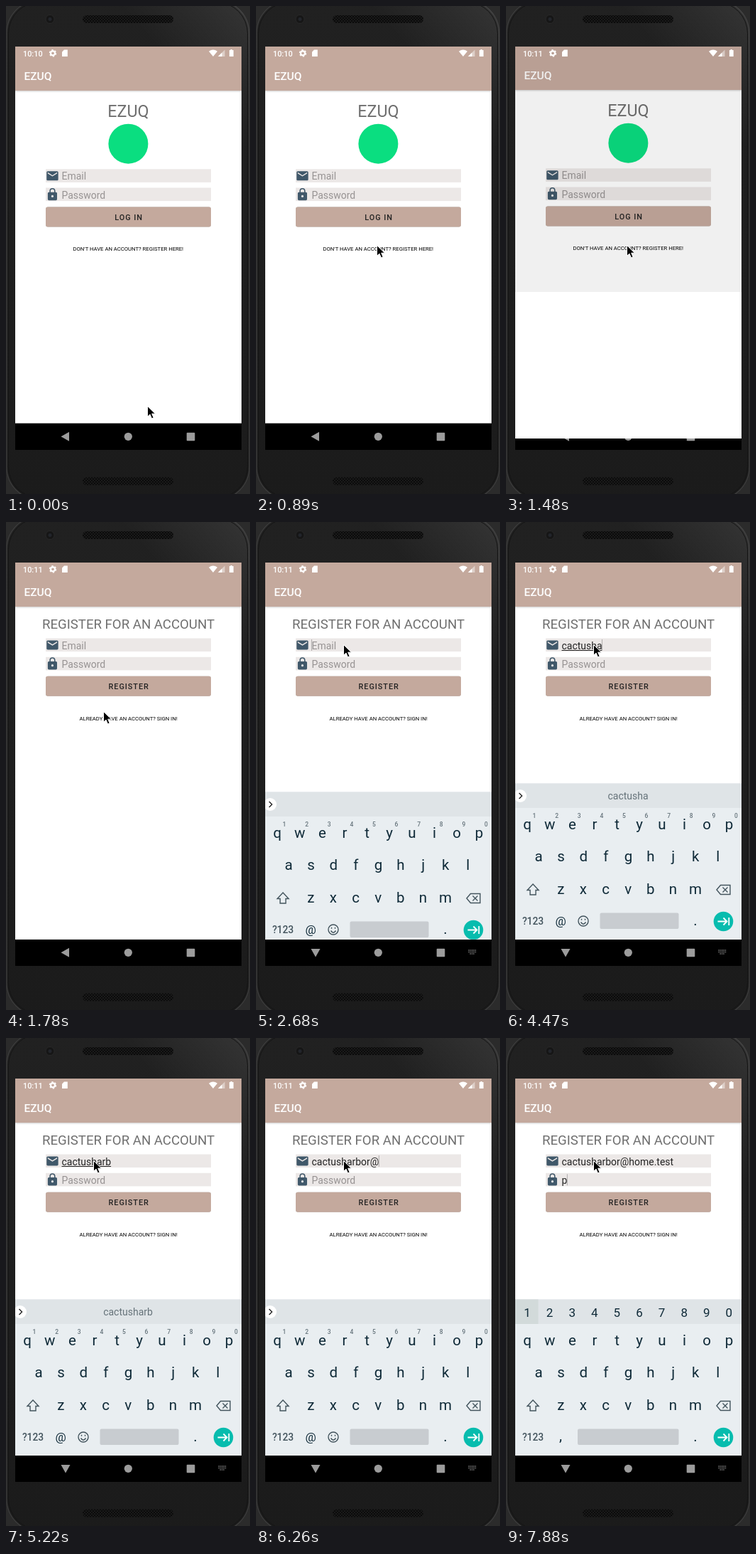
Recreate the animation shown at these times as an HTML page. Size 344x686 px, loop 8000 ms.

```html
<!DOCTYPE html>
<html lang="en">
<head>
<meta charset="utf-8">
<title>Register flow</title>
<style>
html, body { margin: 0; width: 100%; height: 100%; overflow: hidden; background: #2b2b2b; }
svg { display: block; width: 344px; height: 686px; font-family: Roboto, sans-serif; }
text { white-space: pre; }
.mid { text-anchor: middle; }
.med { font-weight: 500; }
.bar, .btn { fill: #c4a99d; }
.btn { filter: drop-shadow(0 .8px .5px rgba(0,0,0,.28)); }
.bar { filter: drop-shadow(0 1px 1px rgba(0,0,0,.2)); }
.hint { fill: #979393; }
.input, .hint { font-size: 13.97px; }
.input { fill: #242424; }
.head { fill: #6f6f6f; }
.icon { fill: #40586a; }
.key { fill: #0f2a38; font-size: 20.5px; text-anchor: middle; }
.line { fill: none; stroke: #43545d; stroke-width: 1.4; }
</style>
</head>
<body>
<svg viewBox="0 0 344 686">
  <defs>
    <pattern id="mesh" width="4" height="4" patternUnits="userSpaceOnUse">
      <rect width="4" height="4" fill="#0b0b0b"/>
      <circle cx="1" cy="1" r=".8" fill="#2c2c2c"/><circle cx="3" cy="3" r=".8" fill="#2c2c2c"/>
    </pattern>
    <linearGradient id="body" x2="0" y2="1">
      <stop offset="0" stop-color="#212121"/><stop offset="1" stop-color="#1b1b1b"/>
    </linearGradient>
    <linearGradient id="glare" gradientUnits="userSpaceOnUse" x1="344" y1="0" x2="240" y2="90">
      <stop offset="0" stop-color="#fff" stop-opacity=".09"/><stop offset="1" stop-color="#fff" stop-opacity="0"/>
    </linearGradient>
    <clipPath id="screen"><rect x="13" y="57" width="319" height="567"/></clipPath>
    <clipPath id="app"><rect x="13" y="57" width="319" height="529.800"/></clipPath>
    <clipPath id="reveal"><rect id="revealBox" x="13" width="319" height="600"/></clipPath>
  </defs>

  <rect x="1" y="-8" width="342" height="702" rx="46" fill="url(#body)" stroke="#3d3d3d" stroke-width="1.2"/>
  <rect x="1" y="-8" width="342" height="702" rx="46" fill="url(#glare)"/>
  <rect x="3.500" y="-5.500" width="337" height="697" rx="44" fill="none" stroke="#151515"/>
  <circle cx="62" cy="18.500" r="6" fill="#161616" stroke="#292929"/>
  <circle cx="62" cy="18.500" r="2.500" fill="#22252b"/>
  <rect x="108" y="13" width="128" height="11" rx="5.500" fill="url(#mesh)"/>
  <rect x="108" y="662.500" width="128" height="11" rx="5.500" fill="url(#mesh)"/>

  <g clip-path="url(#screen)">
    <rect x="13" y="57" width="319" height="567"/>
    <g fill="#9c9c9c">
      <path id="back"/>
      <circle cx="172.300" cy="605.300" r="5.600"/>
      <rect x="254.700" y="599.700" width="11.600" height="11.600" rx="1"/>
      <path id="imeIcon" d="M299.500 602H310.500M299.500 604.500H310.500M301.500 607H308.500" fill="none" stroke="#777" stroke-width="1.500" stroke-dasharray="1.500 .8"/>
    </g>
    <g clip-path="url(#app)">
      <g id="login"></g>
      <rect id="dim" x="13" y="57" width="319" height="530" opacity=".06"/>
    </g>
    <g clip-path="url(#reveal)"><g id="register"></g></g>
    <g clip-path="url(#app)"><g id="keyboard"></g></g>
    <g id="status" fill="#fff"></g>
  </g>
  <path id="mouse" d="M0 0V14.800L3.500 11.600L6 17.400L8.600 16.300L6.200 10.700H11Z" stroke="#fff" stroke-width="1"/>
</svg>
<script>
const $ = id => document.getElementById(id);
const LOOP = 8000, APP = 'EZUQ', USER = 'cactusharbor', HOST = 'home.test';

const MAIL = 'M20 4H4c-1.100 0-2 .9-2 2v12c0 1.100.9 2 2 2h16c1.100 0 2-.9 2-2V6c0-1.100-.9-2-2-2zm0 4l-8 5-8-5V6l8 5 8-5z';
const LOCK = 'M18 8h-1V6a5 5 0 0 0-10 0v2H6a2 2 0 0 0-2 2v10a2 2 0 0 0 2 2h12a2 2 0 0 0 2-2V10a2 2 0 0 0-2-2zm-6 9a2 2 0 1 1 0-4a2 2 0 0 1 0 4zm3.100-9H8.900V6a3.100 3.100 0 0 1 6.200 0z';

const text = (x, y, size, str, cls = '', extra = '') =>
  `<text x="${x}" y="${y}" font-size="${size}" class="${cls}" ${extra}>${str}</text>`;

const field = (y, icon, hint, id = '') => `
  <rect x="56" y="${y}" width="233" height="18.600" fill="#ece8e7"/>
  <path class="icon" d="${icon}" transform="translate(55.600 ${y - .4}) scale(.82)"/>
  <text class="hint" x="78.500" y="${y + 15}" id="${id}Hint">${hint}</text>
  ${id && `<text class="input" x="78.500" y="${y + 15}" id="${id}"></text>`}`;

const button = (y, label) => `
  <rect class="btn" x="56" y="${y}" width="233" height="28" rx="3"/>
  ${text(173.200, y + 18, 10.860, label, 'mid med', 'letter-spacing=".97" fill="#222"')}`;

const page = content => `
  <rect x="13" y="57" width="319" height="529.800" fill="#fff"/>
  <rect class="bar" x="13" y="57" width="319" height="62"/>
  ${text(25.400, 103.500, 15.520, APP, 'med', 'fill="#fff"')}${content}`;

$('login').innerHTML = page(`
  ${text(172.500, 155.500, 23.280, APP, 'mid head')}
  <circle cx="172.400" cy="193.700" r="28" fill="#0ade80"/>
  ${field(229.300, MAIL, 'Email')}${field(255.500, LOCK, 'Password')}
  ${button(282.500, 'LOG IN')}
  <rect id="ripple" x="56" y="327" width="233" height="28" rx="3" opacity=".1"/>
  ${text(172.300, 344.300, 7.700, "DON'T HAVE AN ACCOUNT? REGISTER HERE!", 'mid')}`);

$('register').innerHTML = page(`
  ${text(172.500, 150, 18.620, 'REGISTER FOR AN ACCOUNT', 'mid head')}
  ${field(163.500, MAIL, 'Email', 'email')}${field(189.800, LOCK, 'Password', 'pass')}
  ${button(216.800, 'REGISTER')}
  <rect id="underline" y="180" height="1" fill="#242424"/>
  <rect id="caret" width="1" height="16" fill="#b0adad"/>
  ${text(172.600, 278.600, 7.700, 'ALREADY HAVE AN ACCOUNT? SIGN IN!', 'mid')}`);

const row = (chars, x, y, size = 20.5, cls = 'key', extra = '') => [...chars].map((c, i) =>
  `<text class="${cls}" x="${x + 31.6 * i}" y="${y}" style="font-size:${size}px" ${extra}>${c}</text>`).join('');

$('keyboard').innerHTML = `
  <rect x="13" y="367.500" width="319" height="220" fill="#e9eef1"/>
  <rect x="13" y="367.500" width="319" height="34.500" fill="#dfe4e7"/>
  <g id="mailKeys">
    <circle cx="20" cy="385" r="9" fill="#fff"/>
    <path class="line" d="M18.500 381L22.500 385L18.500 389" style="stroke:#222"/>
    <text id="suggest" class="mid" x="172" y="390" font-size="14" fill="#66737a"></text>
    ${row('1234567890', 40, 416, 8.5, 'mid med', 'fill="#66747c"')}
    ${text(77.200, 567, 17, '@', 'mid', 'fill="#0f2a38"')}
    <circle class="line" cx="109" cy="561" r="7"/>
    <path class="line" d="M105.500 562.500Q109 568 112.500 562.500M106.500 557.800V559.800M111.500 557.800V559.800"/>
  </g>
  <g id="passKeys">
    <rect id="press" x="13" y="367.500" width="32.500" height="34.500" fill="#d2dada"/>
    ${row('1234567890', 30, 391.8, 17)}
    ${text(77, 566, 20.500, ',', 'key')}
  </g>
  ${row('qwertyuiop', 30.2, 432)}${row('asdfghjkl', 46, 477.3)}${row('zxcvbnm', 77.3, 523)}
  <path class="line" d="M38 509L46 517.500H42V524H34V517.500H30Z"/>
  <path class="line" d="M297 517L302.500 510.500H316V523.500H302.500ZM305.500 513.500L312.500 520.500M312.500 513.500L305.500 520.500"/>
  ${text(38, 566, 13.800, '?123', 'mid med', 'fill="#43545d"')}
  <rect id="space" y="549.500" height="22.500" rx="2" fill="#c8ccd0"/>
  ${text(267, 567, 20.500, '.', 'key')}
  <circle cx="306.500" cy="561.500" r="13.800" fill="#07bcae"/>
  <path class="line" d="M298.500 561.500H311M306.500 556.500L311.500 561.500L306.500 566.500M314.300 556V567" style="stroke:#fff;stroke-width:1.800"/>`;

$('status').innerHTML = `
  <text id="clock" class="med" x="24" y="70.500" font-size="10.860"></text>
  <circle cx="66" cy="66.300" r="3" fill="none" stroke="#fff" stroke-width="2.200"/>
  <circle cx="66" cy="66.300" r="4.500" fill="none" stroke="#fff" stroke-width="1.400" stroke-dasharray="2.360"/>
  <path d="M82 61.500H86.800V71H79V64.500Z"/>
  <path d="M286 63.700Q292 59.300 298 63.700L292 71Z"/>
  <path d="M308.500 61.500V71H299Z" opacity=".45"/><path d="M304.500 65.500V71H299Z"/>
  <path d="M316.500 61H318.800V62H320.700V71H314.900V62H316.500Z"/>`;

// Step tables: [start time, value...]; a value holds until the next row.
const mousePath = [[0, 199.5, 562.5], [290, 205, 542], [440, 206, 476], [590, 196, 408], [740, 179, 355],
  [890, 170.5, 336.5], [1630, 157, 312], [1780, 137.5, 266.5], [1930, 128, 212], [2080, 123.5, 172.5]];
const openSteps = [[0, 600, 0], [1480, 402, 21.2], [1630, 57, 3], [1780, 57, 0]];
const slideSteps = [[0, 220], [2380, 150], [2530, 55], [2680, 12], [2830, 0]];
const userSteps = [[0, 0], [3130, 1], [3430, 2], [3580, 4], [3880, 5], [4020, 7], [4470, 8],
  [4620, 9], [4770, 10], [5510, 11], [5660, 12], [6260, 13]];
const hostSteps = [[0, 0], [6410, 1], [6560, 2], [6700, 4], [6850, 5], [7000, 7], [7140, 9]];

const at = (steps, t) => steps.findLast(s => s[0] <= t).slice(1);
const set = (id, attrs) => { for (const k in attrs) $(id).setAttribute(k, attrs[k]); };
const show = (id, on) => $(id).setAttribute('visibility', on ? 'inherit' : 'hidden');
const move = (id, x, y) => set(id, { transform: `translate(${x} ${y})` });

function draw(t) {
  move('mouse', ...at(mousePath, t));
  $('clock').textContent = t < 1180 ? '10:10' : '10:11';

  const [top, shift] = at(openSteps, t);
  set('revealBox', { y: top });
  move('register', 0, shift);
  const opening = t >= 1480 && t < 1780;
  move('login', 0, opening ? -1 : 0);
  show('dim', opening);
  show('ripple', t >= 1180 && t < 1480);

  const onPass = t >= 7430, keys = t >= 2380;
  move('keyboard', 0, at(slideSteps, t)[0]);
  show('keyboard', keys);
  show('mailKeys', !onPass);
  show('passKeys', onPass);
  show('press', t >= 7580);
  set('space', onPass ? { x: 101, width: 142.5 } : { x: 132.5, width: 111 });
  show('imeIcon', keys);
  set('back', { d: keys ? 'M77.500 600H90.500L84 611.500Z' : 'M77.500 605.300L89 598.800V611.800Z' });

  const user = (USER + '@').slice(0, at(userSteps, t)[0]);
  const host = HOST.slice(0, at(hostSteps, t)[0]);
  const email = user + host, pass = t >= 7880 ? 'p' : '';
  $('email').textContent = email;
  $('pass').textContent = pass;
  show('emailHint', !email);
  show('passHint', !pass);

  // The word being composed is underlined and suggested.
  const word = user.endsWith('@') ? host : user;
  $('suggest').textContent = word;
  const end = $('email').getComputedTextLength();
  const from = word && word !== email ? $('email').getSubStringLength(0, user.length) : 0;
  set('underline', { x: 78.5 + from, width: word && !onPass ? end - from : 0 });

  const width = onPass ? $('pass').getComputedTextLength() : end;
  set('caret', { x: 78 + width, y: onPass ? 191.3 : 165 });
  show('caret', t >= 2230 && !(t >= 5220 && t < 5510));
}

const start = performance.now();
function tick() {
  draw((performance.now() - start) % LOOP);
  requestAnimationFrame(tick);
}
tick();
</script>
</body>
</html>
```
